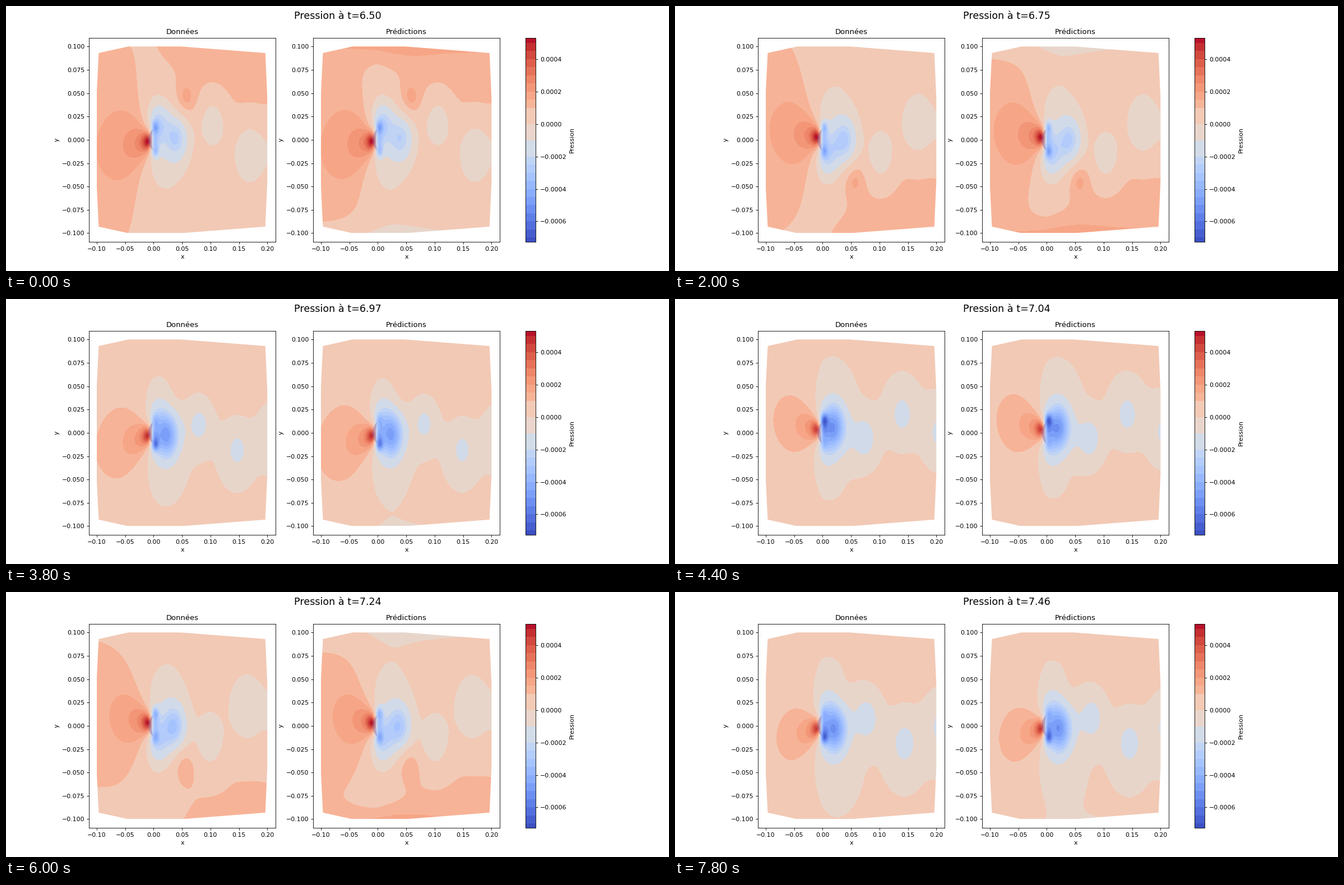
Write a matplotlib script that moves like this. It is 1183x473 px and loops after 8 s.

```python
import numpy as np
import matplotlib.pyplot as plt
from matplotlib.animation import FuncAnimation
from matplotlib.colors import BoundaryNorm, ListedColormap
from matplotlib.patches import Polygon

W, H = 1183, 473
DPI = W / 15
FRAMES, STEP_MS = 40, 200
T0, DT = 6.5, 0.0247
PERIOD = 6.72          # frames per vortex-shedding cycle
UNIT = 1e-4            # pressure unit; lengths below are in centimetres
P_MIN, P_MAX = -7.26, 5.31

x, y = np.meshgrid(np.linspace(-10, 20, 220), np.linspace(-10, 10, 240))


def sigmoid(v):
    return 1 / (1 + np.exp(-v))


def bump(cx, cy, sx, sy):
    return np.exp(-((x - cx) / sx) ** 2 / 2 - ((y - cy) / sy) ** 2 / 2)


WAKE = -1.2 * bump(1.5, 0, 3, 4.2) - 0.7 * bump(0.15, 0, 0.4, 1.0)
TILT = 0.4 * np.tanh(y / 4) * sigmoid(x / 1.5)
FRONT = sigmoid(-(x + 0.35) / 0.08)
EDGE = np.sign(y) * np.exp(-(10 - np.abs(y)) / 1.1) * (0.5 + 0.4 * bump(2.5, 0, 5, 99))


def stagnation(y0):
    """High pressure upstream of the body, swinging with the lift."""
    dx = x + 0.3
    dy = y - y0 * (1 + 0.5 * np.maximum(-dx, 0))
    dipole = -6.5 * dx / (dx ** 2 + 1.5 * dy ** 2 + 0.6)
    dipole *= np.where(dx > 0, 0.45 * np.exp(-np.abs(dx) / 1.5), 1)
    return dipole + 1.5 * bump(-1.1, y0, 0.6, 0.7) * FRONT


def vortex(age, side):
    """Low pressure that grows behind the body, then drifts away."""
    cx = 0.5 + 1.69 * np.log1p(np.exp((age - 0.24) / 0.13))
    swing = min(age - 1.12, 0.7 * (age - 1.12))
    cy = 0.95 + 1.15 * np.cos(2 * np.pi * swing / 1.2)
    growth = 1.7 * sigmoid((age + 0.15) / 0.1) * (1 - 0.1 * age)
    core = 2.2 * np.exp(-((age - 0.28) / 0.17) ** 2 / 2)
    r = min(1.35 + 0.5 * age, 2.1)
    return -(growth + core) * bump(cx, side * cy, r, 1.15 * r)


def pressure(frame, predicted):
    phase = frame / PERIOD + 0.012 * predicted
    turn = 2 * np.pi * phase
    mean = 0.6 - 0.0055 * frame + 0.25 * np.cos(2 * turn)
    y0 = 0.28 * np.sin(turn - 0.2 * np.pi)
    p = mean + WAKE + TILT * np.cos(turn) + stagnation(y0)

    for side, shift in ((1, 0), (-1, 0.5)):
        spot = 2.2 + 1.3 * side * np.sin(turn)
        p -= spot * bump(0.25, 1.3 * side, 0.45, 0.5)

        birth = (phase + shift + 0.5) % 1 - 0.5
        for k in range(3):
            p += vortex(birth + k, side)

        # high pressure between two vortices on the same side
        crest = 0.9 * np.exp(-(birth / 0.16) ** 2)
        p += crest * bump(5.5 + 8 * birth, 4.2 * side, 1.3, 1.3)

    if predicted:
        p += EDGE * np.cos(turn - 0.1 * np.pi)
    return p * UNIT


def band_colors():
    inner = [v for v in np.arange(-7, 5.5, 0.5) if v not in (-1.5, -0.5, 0.5)]
    edges = np.array([P_MIN, *inner, P_MAX])
    mids = (edges[:-1] + edges[1:]) / 2
    tones = np.where(np.abs(mids) < 1, 0.7 * mids, mids)
    colors = plt.get_cmap("coolwarm")((tones - P_MIN) / (P_MAX - P_MIN))
    return ListedColormap(colors), BoundaryNorm(edges * UNIT, len(mids))


def domain_outline():
    top = np.array([(-10, 5), (-9.65, 9.3), (-4.45, 10),
                    (4.8, 10), (19.65, 9.3), (20, 4.5)])
    return np.vstack([top, top[::-1] * (1, -1)]) / 100


def body_lens():
    s = np.linspace(-1, 1, 25)
    left = np.column_stack([-0.15 - 0.8 * (1 - s ** 2), 1.15 * s])
    right = np.column_stack([-0.15 - 0.15 * (1 - s ** 2), 1.15 * s])[::-1]
    return np.vstack([left, right]) / 100


fig, axes = plt.subplots(1, 2, figsize=(W / DPI, H / DPI), dpi=DPI)
cmap, norm = band_colors()
images = []
for i, (ax, name) in enumerate(zip(axes, ("Données", "Prédictions"))):
    im = ax.imshow(pressure(0, i), extent=(-0.1, 0.2, -0.1, 0.1), origin="lower",
                   aspect="auto", cmap=cmap, norm=norm, interpolation="bilinear")
    im.set_clip_path(Polygon(domain_outline(), transform=ax.transData))
    ax.add_patch(Polygon(body_lens(), fc="#7a5aa8", alpha=0.4, lw=0))
    ax.set(title=name, xlabel="x", ylabel="y",
           xlim=(-0.1138, 0.2148), ylim=(-0.1093, 0.1093))
    ax.set_xticks(np.arange(-2, 5) * 0.05)
    ax.set_yticks(np.arange(-4, 5) * 0.025)
    images.append(im)

bar = fig.colorbar(images[0], ax=list(axes), label="Pression", spacing="proportional",
                   ticks=np.arange(-6, 5, 2) * UNIT)
bar.minorticks_off()
heading = fig.suptitle("", fontsize=16)


def draw(frame):
    for i, im in enumerate(images):
        im.set_data(pressure(frame, i))
    heading.set_text(f"Pression à t={T0 + DT * frame:.2f}")
    return [*images, heading]


anim = FuncAnimation(fig, draw, frames=FRAMES, interval=STEP_MS, repeat=True, repeat_delay=0)
plt.show()
```
